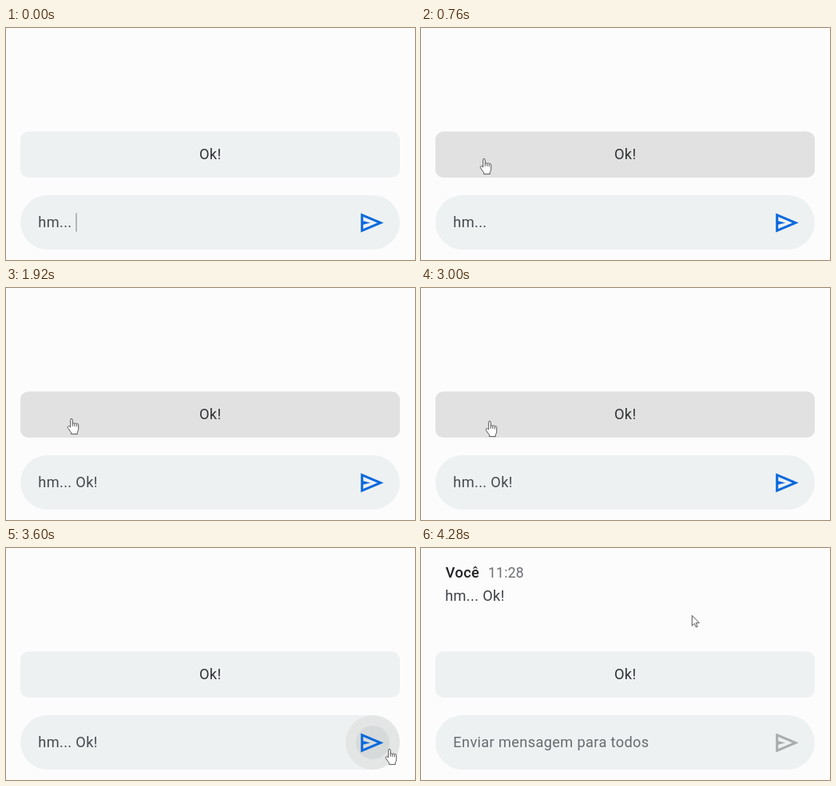
These frames come from a looping animation (512x290 px, 4.32 s). An HTML page:

```html
<!DOCTYPE html>
<html lang="pt">
<head>
<meta charset="utf-8">
<title>Chat</title>
<style>
  html, body { margin: 0; width: 100%; height: 100%; overflow: hidden; background: #fcfcfc; }
  svg { display: block; width: 512px; height: 290px; }
  text { font: 400 18.2px Roboto, sans-serif; letter-spacing: .36px; fill: #3c4043; white-space: pre; }
  .panel { fill: #edf1f2; }
  .pointer path { fill: #fff; stroke: #444; stroke-width: .9; stroke-linejoin: round; }
</style>
</head>
<body>
<svg viewBox="0 0 512 290">
  <rect width="512" height="290" fill="#fcfcfc"/>

  <g id="message">
    <text x="30.7" y="37" style="font-weight:500;fill:#202124">Você</text>
    <text id="clock" x="84" y="37" style="font-size:17.5px;letter-spacing:.25px;fill:#6b6e72">11:28</text>
    <text id="sent" x="30.2" y="66">hm... Ok!</text>
  </g>

  <rect class="panel" x="18" y="129.5" width="475" height="57.5" rx="10"/>
  <rect id="chipHover" x="18" y="129.5" width="475" height="57.5" rx="10" fill="#e1e1e1"/>
  <text x="255.7" y="164" text-anchor="middle" style="fill:#303236">Ok!</text>

  <rect class="panel" x="18" y="209" width="475" height="68" rx="34"/>
  <text id="field" x="40.3" y="249"></text>
  <rect id="caret" y="231.5" width="1.2" height="23"/>

  <circle id="sendHover" cx="459" cy="243" r="34" fill="#e4e6e6"/>
  <circle id="ripple" cx="459" cy="243" fill="#d7dada"/>
  <path id="send" transform="translate(439.7 225.5) scale(1.5)"
        d="M3 20V4l19 8-19 8zm2-3l11.85-5L5 7v3.5l6 1.5-6 1.5V17z"/>

  <g id="cursor" class="pointer">
    <path id="arrow" d="M.3 .3V13.2L3.3 10.4 5.3 15 7.2 14.2 5.2 9.7H9.3Z"/>
    <g id="hand">
      <path d="M-1.3 11V1.7A1.3 1.3 0 0 1 1.3 1.7V6.6A1.3 1.2 0 0 1 3.8 6.8A1.3 1.2 0 0 1 6.3 7.5A1.2 1.2 0 0 1 8.7 8.6V13.5Q8.7 15.5 7.3 17.3V19.6H-.4V17.8L-4.6 11.7Q-5.2 10.2 -3.8 9.6Q-2.9 9.4 -1.3 11Z"/>
      <path d="M1.3 6.6V9.8M3.8 7V10M6.3 7.7V10.3" style="fill:none"/>
    </g>
  </g>
</svg>
<script>
const LOOP = 4320, STEP = 40;
const ui = Object.fromEntries([...document.querySelectorAll('[id]')].map(el => [el.id, el]));

// time, x, y of the pointer tip
const route = [
  [80, -14, 181], [200, 8, 175], [360, 40, 168], [600, 69, 164], [760, 79, 163],
  [1120, 82, 163], [2960, 82, 163], [3000, 86, 166], [3120, 132, 180],
  [3280, 272, 214], [3400, 408, 239], [3520, 480, 251], [3800, 480, 251],
  [3960, 456, 212], [4120, 399, 144], [4280, 339, 84]
];

const clamp = v => Math.min(1, Math.max(0, v));
const ramp = (t, start, length) => clamp((t - start) / length);
const within = (t, a, b) => t >= a && t < b;
const show = (el, on) => el.setAttribute('visibility', on ? 'inherit' : 'hidden');

function pointerAt(t) {
  const i = route.findIndex(k => k[0] >= t);
  if (i === 0) return route[0].slice(1);
  if (i < 0) return route[route.length - 1].slice(1);
  const [t0, x0, y0] = route[i - 1], [t1, x1, y1] = route[i];
  const p = (t - t0) / (t1 - t0);
  return [x0 + (x1 - x0) * p, y0 + (y1 - y0) * p];
}

function draw(t) {
  const cleared = t >= 3680, posted = t >= 3720, confirmed = t >= 4000;
  const [x, y] = pointerAt(t);

  const onChip = x >= 18 && y >= 130 && y <= 187;
  const onSend = t < 3680 && Math.hypot(x - 459, y - 243) < 34;
  ui.cursor.setAttribute('transform', `translate(${x} ${y})`);
  show(ui.hand, t < 3680 && (onChip || onSend));
  show(ui.arrow, !(t < 3680 && (onChip || onSend)));

  ui.chipHover.setAttribute('opacity', ramp(t, 240, 240) - ramp(t, 3160, 240));
  ui.sendHover.setAttribute('opacity', cleared ? 0 : ramp(t, 3400, 120));
  ui.ripple.setAttribute('r', cleared ? 0 : 34 * ramp(t, 3500, 162));
  ui.send.setAttribute('fill', cleared ? '#a9acad' : '#0b69dc');

  ui.field.textContent = cleared ? 'Enviar mensagem para todos' : t >= 1840 ? 'hm... Ok!' : 'hm...';
  ui.field.style.fill = cleared ? '#686b6f' : '#45484c';
  ui.caret.setAttribute('x', cleared ? 40.6 : 87.4);
  ui.caret.setAttribute('fill', cleared ? '#55585b' : '#8d9092');
  show(ui.caret, t < 520 || within(t, 1040, 1520) || within(t, 3680, 4200));

  show(ui.message, posted);
  show(ui.clock, confirmed);
  ui.sent.style.fill = confirmed ? '#3c4043' : '#9b9d9f';
}

const start = performance.now();
function tick() {
  const t = (performance.now() - start) % LOOP;
  draw(Math.floor(t / STEP) * STEP);
  requestAnimationFrame(tick);
}
draw(0);
requestAnimationFrame(tick);
</script>
</body>
</html>
```
